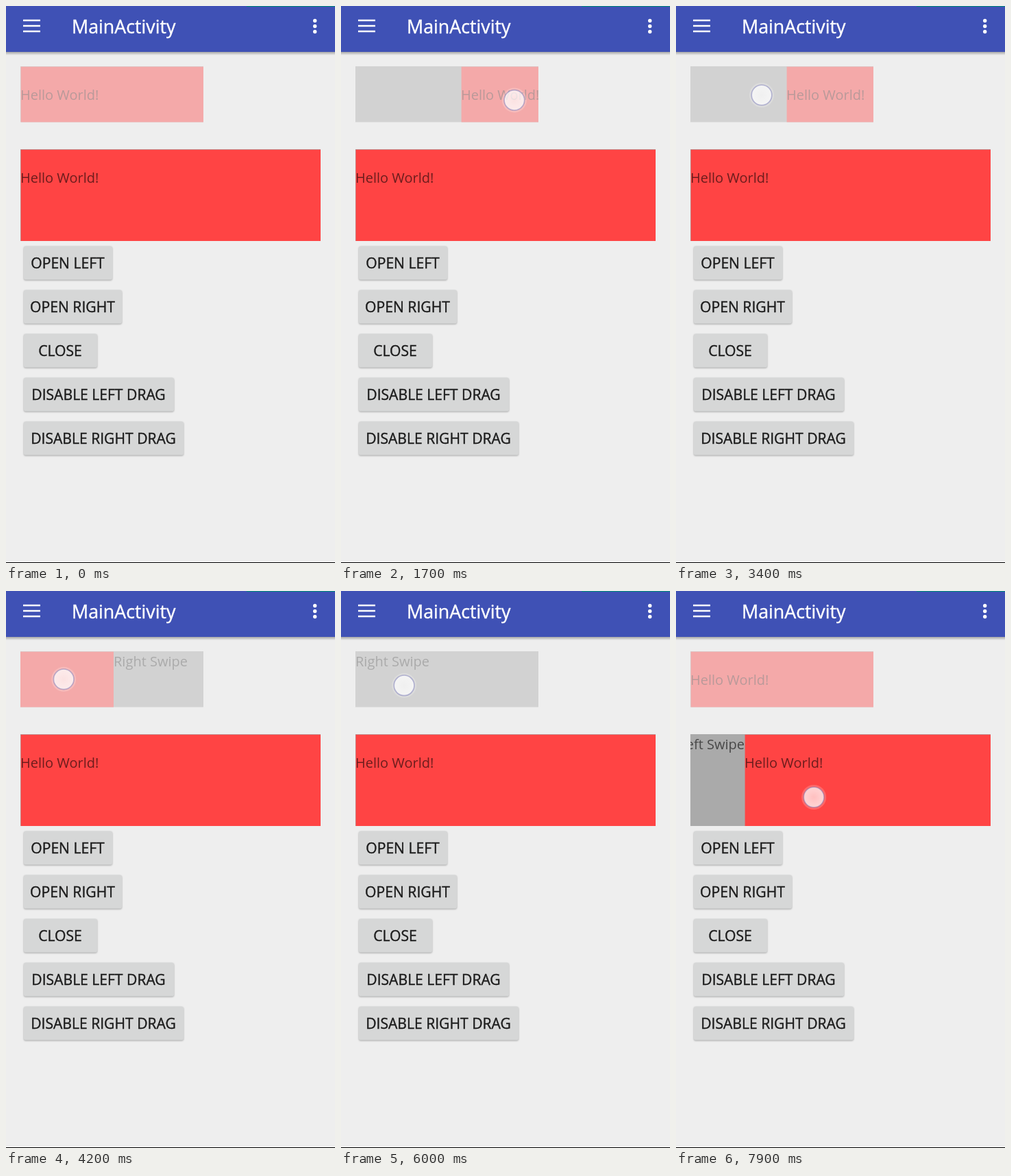
Animation of 480 by 813 pixels, one loop 8000 ms. Source, as an HTML page:

```html
<!DOCTYPE html>
<html lang="en">
<head>
<meta charset="utf-8">
<title>Swipe panels</title>
<style>
  html, body { margin: 0; width: 100%; height: 100%; overflow: hidden; background: #eee; }
  #stage { display: block; width: 480px; height: 813px; }
  text { font: 20px "Open Sans", "Noto Sans", sans-serif; }
  .panel text { fill: #000; fill-opacity: .58; }
  .title { font-size: 26.8px; fill: #fff; stroke: #fff; stroke-width: .4; }
  .btn rect { fill: #d6d7d7; filter: drop-shadow(0 1.5px 1px rgba(0, 0, 0, .3)); }
  .btn text { font-size: 21.1px; fill: #1c1c1c; stroke: #1c1c1c; stroke-width: .4; text-anchor: middle; }
  .red { fill: #f44; }
  .gray { fill: #aaa; }
</style>
</head>
<body>
<svg id="stage" viewBox="0 0 480 813">
  <defs>
    <linearGradient id="shade" x2="0" y2="1">
      <stop offset="0" stop-color="#000" stop-opacity=".3"/>
      <stop offset="1" stop-color="#000" stop-opacity="0"/>
    </linearGradient>
    <radialGradient id="glow">
      <stop offset="0" stop-color="#fff" stop-opacity=".58"/>
      <stop offset="1" stop-color="#fff" stop-opacity=".72"/>
    </radialGradient>
  </defs>

  <rect width="480" height="813" fill="#eee"/>
  <rect y="67" width="480" height="5" fill="url(#shade)"/>
  <rect width="480" height="67" fill="#3f51b5"/>
  <rect x="351" width="129" height="1" fill="#00897b"/>
  <path d="M25 21h25M25 29h25M25 37h25" stroke="#fff" stroke-width="2.5"/>
  <text class="title" x="96" y="40">MainActivity</text>
  <path d="M450.7 21.5v0M450.7 29.5v0M450.7 37.5v0" stroke="#fff" stroke-width="5.4" stroke-linecap="round"/>

  <svg class="panel" x="21" y="88" width="267" height="81.5" opacity=".4">
    <rect class="gray" width="267" height="82"/>
    <g id="top">
      <text x="-267" y="22">Left Swipe</text>
      <text x="267" y="22">Right Swipe</text>
      <rect class="red" x=".6" y=".6" width="266.4" height="82"/>
      <text x="0" y="49">Hello World!</text>
    </g>
  </svg>

  <svg class="panel" x="21" y="209" width="438" height="134">
    <rect class="gray" width="438" height="134"/>
    <g id="bottom">
      <text y="22" text-anchor="end">Left Swipe</text>
      <rect class="red" x=".6" y=".7" width="437.4" height="134"/>
      <text x="0" y="49">Hello World!</text>
    </g>
  </svg>

  <g id="buttons"></g>

  <g id="finger">
    <circle r="18" fill="#fff" fill-opacity=".2"/>
    <circle r="14.8" fill="url(#glow)" stroke="#7878b8" stroke-opacity=".5" stroke-width="1.6"/>
  </g>
  <rect y="812" width="480" height="1" fill="#000"/>
</svg>

<script>
const LOOP = 8000, TICK = 100, SETTLE = 250, SLOP = 10;
const $ = id => document.getElementById(id);

const labels = {
  'OPEN LEFT': 129, 'OPEN RIGHT': 143, 'CLOSE': 107,
  'DISABLE LEFT DRAG': 219, 'DISABLE RIGHT DRAG': 233
};
$('buttons').innerHTML = Object.entries(labels).map(([label, w], i) =>
  `<g class="btn" transform="translate(26 ${350.5 + i * 64})">
    <rect width="${w}" height="49" rx="2.7"/>
    <text x="${w / 2 - .5}" y="32.5">${label}</text>
  </g>`).join('');

// Each drag moves the finger between two points; on release the panel settles at rest.
const drags = [
  { panel: 'top', start: 100, end: 1900, from: [89, 134], to: [280, 138], power: 1.3, rest: 267 },
  { panel: 'top', start: 2800, end: 3400, from: [262, 132], to: [125, 130], power: 1, rest: 0 },
  { panel: 'top', start: 3700, end: 4800, from: [225, 131], to: [32, 128], power: .4, rest: -267 },
  { panel: 'top', start: 5400, end: 6800, from: [82, 135], to: [262, 186], power: 3.4, rest: 0 },
  { panel: 'bottom', start: 7300, end: 8000, from: [112, 298], to: [216, 301.5], power: 1, rest: 99 }
];

const clamp = u => Math.min(1, Math.max(0, u));
const mix = (a, b, u) => a + (b - a) * u;
const easeOut = u => 1 - (1 - u) ** 3;
const move = (id, x, y = 0) => $(id).setAttribute('transform', `translate(${x} ${y})`);

function touch(d, t) {
  const u = clamp((t - d.start) / (d.end - d.start)) ** d.power;
  return d.from.map((v, i) => mix(v, d.to[i], u));
}

function offset(panel, t) {
  let x = 0, rest = 0;
  for (const d of drags) {
    if (d.panel !== panel || t < d.start) continue;
    const dx = touch(d, t)[0] - d.from[0];
    const pulled = rest + Math.sign(dx) * Math.max(0, Math.abs(dx) - SLOP);
    x = mix(pulled, d.rest, easeOut(clamp((t - d.end) / SETTLE)));
    rest = d.rest;
  }
  return Math.round(x);
}

const begin = performance.now();

function draw(now) {
  const t = Math.floor(Math.max(0, now - begin) % LOOP / TICK) * TICK;
  move('top', offset('top', t));
  move('bottom', offset('bottom', t));
  const active = drags.find(d => t >= d.start && t <= d.end);
  $('finger').style.display = active ? '' : 'none';
  if (active) move('finger', ...touch(active, t));
  requestAnimationFrame(draw);
}
draw(begin);
</script>
</body>
</html>
```
